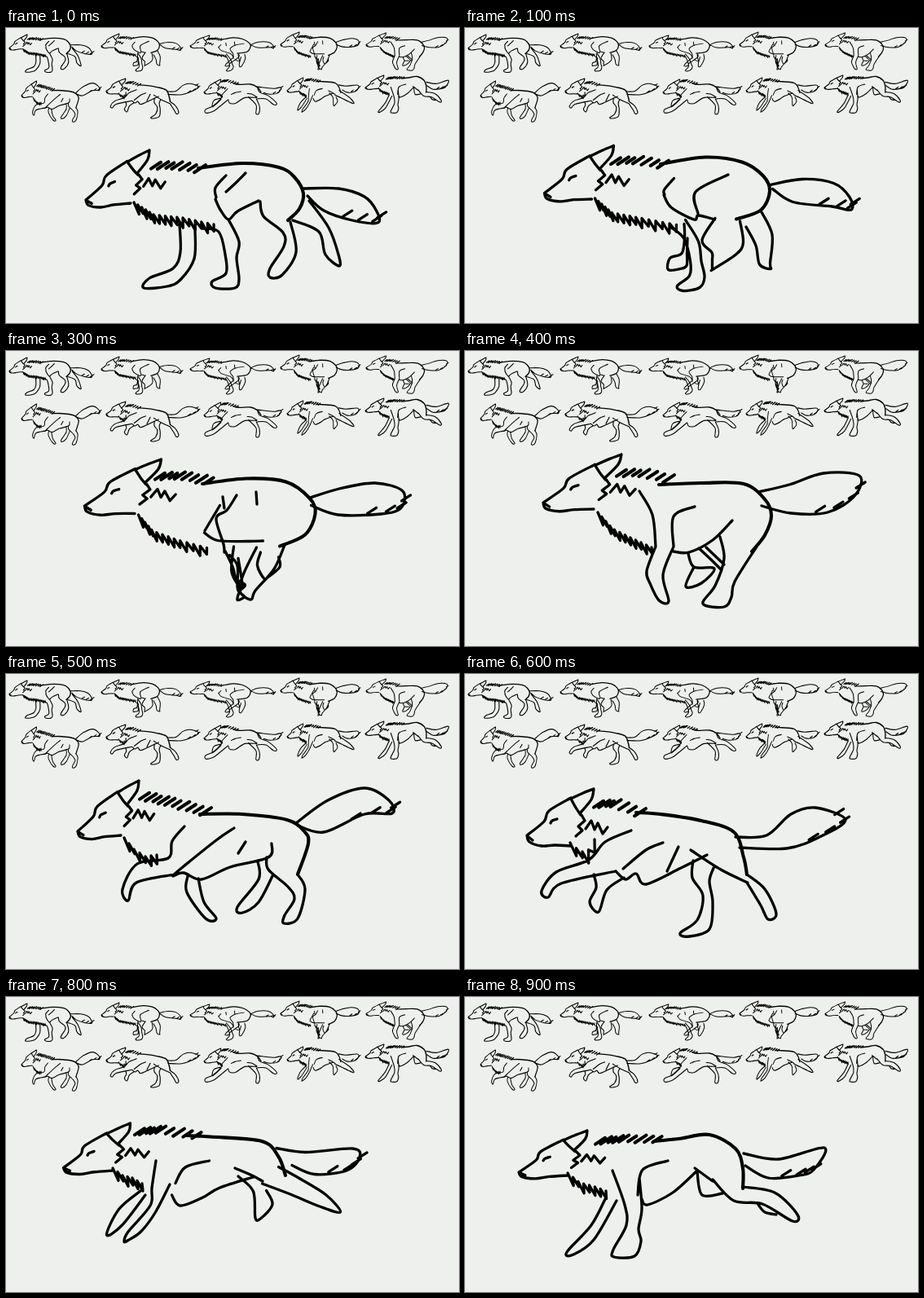
Recreate the animation shown at these times as an HTML page with a canvas. Size 556x362 px, loop 1000 ms.

```html
<!DOCTYPE html>
<html lang="en">
<head>
<meta charset="utf-8">
<title>Running wolf</title>
<style>
html, body { margin: 0; height: 100%; overflow: hidden; background: #eef0ed; }
canvas { display: block; }
</style>
</head>
<body>
<canvas id="stage" width="556" height="362"></canvas>
<script>
const ctx = stage.getContext("2d");

const parse = text => text.split("/").map(part => {
  const n = part.trim().split(/\s+/).map(Number);
  return n.flatMap((x, i) => i % 2 ? [] : [[x, n[i + 1]]]);
});
const pose = parts => Object.fromEntries(Object.entries(parts).map(([k, v]) => [k, parse(v)]));

// Halfway between two poses, part by part
function between(a, b) {
  const out = {};
  for (const key in a) out[key] = a[key].map((line, i) => {
    const other = b[key][i] || line;
    return line.map(([x, y], j) => {
      const [u, v] = other[Math.round(j * (other.length - 1) / (line.length - 1))];
      return [(x + u) / 2, (y + v) / 2];
    });
  });
  return out;
}

// head = nose, ear tip and end of the jaw
const contact = pose({
  head: "98 211 176 150 153 215",
  mane: "184 169 210 169 238 173",
  ruff: "158 218 182 233 218 237 256 245",
  back: "236 172 290 166 335 171 354 183 365 203 360 222 346 236",
  belly: "257 210 263 223 273 235 284 225 310 212",
  marks: "294 178 280 192 270 201/270 181 257 196 258 208",
  frontNear: "240 246 261 250 269 278 270 301 253 311 257 319 281 319 286 308 283 282 286 262 273 235",
  frontFar: "213 241 214 275 205 295 176 307 169 319 198 317 214 309 231 283 232 247",
  hindNear: "312 213 316 231 340 251 341 268 324 295 324 306 339 303 356 275 349 238",
  hindFar: "352 236 384 250 392 278 409 292 408 278 396 245 372 212",
  tail: "365 197 408 197 440 207 455 225 456 239 425 236 390 224 370 206"
});
const gather = pose({
  head: "97 194 189 139 158 205",
  mane: "186 158 215 156 248 162",
  ruff: "163 208 180 228 218 238 265 246",
  back: "244 162 300 151 345 158 378 180 383 198 366 225 320 233",
  belly: "231 200 244 218 289 235 303 258",
  marks: "352 182 312 190 286 210 300 234 302 254/243 188 232 201/266 179 268 193/307 173 308 188",
  frontNear: "264 242 276 266 284 294 281 307 268 322 278 326 295 318 302 303 297 290 287 262 268 236",
  frontFar: "325 240 327 258 330 274 314 269",
  hindNear: "302 254 266 290 266 300 283 296 285 286 327 252 326 236",
  hindFar: "338 252 330 284 331 302 341 299 358 262 355 238",
  tail: "384 188 420 174 465 174 489 190 492 207 476 202 415 203 385 189"
});
const landing = pose({
  head: "96 186 192 127 158 194",
  mane: "192 150 220 150 250 157",
  ruff: "164 202 182 222 206 234 230 245",
  back: "238 164 290 162 342 163 368 182 376 202 368 226 352 246",
  belly: "256 246 275 247 304 232 328 208",
  marks: "214 172 230 201 234 240/282 191 256 203 256 240",
  frontNear: "274 249 281 265 306 267 290 285 271 289 281 265",
  frontFar: "234 240 223 270 227 285 238 306 250 307 243 275 256 240",
  hindNear: "313 228 318 255 307 288 292 310 318 314 327 302 331 283 358 240",
  hindFar: "287 242 302 256 314 268/296 241 318 262",
  tail: "360 173 398 164 440 150 484 153 478 178 445 198 400 199 364 190"
});
const push = pose({
  head: "88 193 163 131 141 198",
  mane: "170 150 205 158 245 169",
  ruff: "146 205 158 219 172 228 186 226",
  back: "238 172 290 172 345 179 366 193 371 208 358 246",
  belly: "205 248 218 244 240 252 275 237 322 225 326 208",
  marks: "280 189 258 204 218 236 205 247/285 220 294 206",
  frontNear: "223 248 222 268 245 300 258 300 243 280 236 251",
  frontFar: "219 187 204 205 199 226 161 233 143 264 150 278 160 256 207 246",
  hindNear: "358 246 367 264 358 300 341 306 342 296 354 276 346 261 322 240 320 225",
  hindFar: "309 230 310 252 284 286 290 293 310 280 328 246",
  tail: "356 183 395 155 440 140 470 155 474 171 440 172 390 194 358 186"
});
const leap = pose({
  head: "76 198 158 141 131 211",
  mane: "164 160 185 159 215 170",
  ruff: "130 211 140 220 150 224 160 207",
  back: "210 170 240 172 290 180 330 194 342 225 346 246",
  belly: "185 242 197 252 210 245 222 258 265 238 297 222",
  marks: "243 207 222 216 194 239/262 212 248 242/277 216 314 240 347 256",
  frontNear: "204 192 172 206 152 228 112 243 94 266 102 274 118 257 185 242",
  frontFar: "158 246 161 262 153 280 164 292 174 265 195 250",
  hindNear: "280 229 279 250 292 272 285 302 264 318 275 322 300 313 304 280 300 254 306 236",
  hindFar: "346 246 368 264 382 294 372 301 363 284 346 256",
  tail: "332 200 370 198 400 172 430 164 467 179 435 200 395 214 337 213"
});
const stretch = pose({
  head: "75 204 155 146 135 207",
  mane: "162 154 185 152 232 165",
  ruff: "137 208 146 214 154 216 162 224",
  back: "212 163 240 169 296 168 328 182 345 203",
  belly: "190 238 195 252 212 256 228 252 270 228 325 228",
  marks: "250 201 222 206 204 214/280 210 300 212 326 226",
  frontNear: "187 189 162 214 156 232 118 266 82 282 84 297 119 290 150 268 188 238",
  frontFar: "157 230 122 241 114 268 127 262 156 236",
  hindNear: "328 184 340 205 378 219 419 253 405 260 368 234 325 234",
  hindFar: "285 225 322 262 321 299 335 300 338 268 323 234",
  tail: "322 179 350 182 410 187 440 182 426 207 385 213 358 206"
});
const reach = pose({
  head: "66 215 150 164 126 219",
  mane: "166 177 195 174 236 175",
  ruff: "127 220 142 232 158 236 174 242",
  back: "232 177 262 174 300 169 332 186 341 210 341 235",
  belly: "217 248 224 255 255 240 285 213",
  marks: "249 201 218 212 212 243/282 210 304 226",
  frontNear: "181 213 196 255 198 280 182 310 183 319 208 318 216 300 213 285 217 260 214 222",
  frontFar: "173 246 155 280 125 313 133 316 158 298 186 250",
  hindNear: "341 233 380 240 408 267 402 275 365 254 330 250 304 224",
  hindFar: "285 215 291 243 316 241/360 255 368 264 382 267",
  tail: "342 192 385 199 441 185 428 212 410 219 372 222 344 207"
});
const poses = [contact, between(contact, gather), gather, between(gather, landing), landing,
  push, leap, stretch, between(stretch, reach), reach];

// Head shape, fitted to the three head points of each pose
const face = parse("76 198 97 181 103 168 130 152/130 153 145 146 158 141/158 141 155 154 141 171/" +
  "130 153 136 164 142 173/76 198 79 206 94 211 110 210 131 211/105 183 107 180 113 178/78 200 83 204");
const cheek = parse("143 173 147 180 139 187 144 192 136 199/148 190 155 180 159 191 163 183 169 196 175 188");
const faceFit = leap.head[0];

// Left, top, width and height of each small drawing
const boxes = parse("4 8 104 46/117 7 100 46/226 9 105 44/337 5 98 46/442 6 101 46/" +
  "19 65 98 50/123 62 115 49/243 63 97 42/345 61 90 42/441 58 102 46");

function fit([n, e, j], [N, E, J]) {
  const ex = e[0] - n[0], ey = e[1] - n[1], jx = j[0] - n[0], jy = j[1] - n[1];
  const det = ex * jy - ey * jx;
  return ([x, y]) => {
    const dx = x - n[0], dy = y - n[1];
    const a = (dx * jy - dy * jx) / det, b = (ex * dy - ey * dx) / det;
    return [0, 1].map(k => N[k] + a * (E[k] - N[k]) + b * (J[k] - N[k]));
  };
}

function along(line, t) {
  const s = t * (line.length - 1), i = Math.min(Math.floor(s), line.length - 2), f = s - i;
  return [0, 1].map(k => line[i][k] + (line[i + 1][k] - line[i][k]) * f);
}

const span = line => Math.hypot(line.at(-1)[0] - line[0][0], line.at(-1)[1] - line[0][1]);

// Smooth curve through all points
function curve(path, p) {
  path.moveTo(...p[0]);
  for (let i = 0; i < p.length - 1; i++) {
    const a = p[i - 1] || p[i], b = p[i], c = p[i + 1], d = p[i + 2] || c;
    path.bezierCurveTo(b[0] + (c[0] - a[0]) / 6, b[1] + (c[1] - a[1]) / 6,
      c[0] - (d[0] - b[0]) / 6, c[1] - (d[1] - b[1]) / 6, ...c);
  }
}

function build(parts) {
  const thin = new Path2D(), bold = new Path2D(), all = [];
  const smooth = (line, path = thin) => { curve(path, line); all.push(...line); };
  const sharp = (line, path = thin) => {
    line.forEach((p, i) => i ? path.lineTo(...p) : path.moveTo(...p));
    all.push(...line);
  };
  const { head: [head], mane: [mane], ruff: [ruff], back, tail: [tail], ...rest } = parts;

  const place = fit(faceFit, head);
  face.forEach(line => smooth(line.map(place)));
  cheek.forEach(line => sharp(line.map(place)));
  back.forEach(line => smooth(line, bold));
  Object.values(rest).flat().forEach(line => smooth(line));
  smooth(tail);

  const tufts = Math.round(span(mane) / 9);
  for (let i = 0; i <= tufts; i++) {
    const [x, y] = along(mane, i / tufts), r = 6 + Math.sin(i * 2.3);
    sharp([[x - r, y + r * .6], [x + r, y - r * .7]], bold);
  }

  const teeth = Math.round(span(ruff) / 7) * 2, fringe = [];
  for (let i = 0; i <= teeth; i++) {
    const [x, y] = along(ruff, i / teeth);
    fringe.push(i % 2 ? [x + 3, y + 7 + 2 * Math.sin(i * 1.7)] : [x - 1, y - 4]);
  }
  sharp(fringe);

  for (let i = 0; i < 4; i++) {
    const [x, y] = along(tail, .52 + i * .08);
    sharp([[x, y - 1], [x + 11, y - 8]]);
  }

  const xs = all.map(p => p[0]), ys = all.map(p => p[1]);
  const x = Math.min(...xs), y = Math.min(...ys);
  return { thin, bold, x, y, w: Math.max(...xs) - x, h: Math.max(...ys) - y };
}

function ink(wolf, weight) {
  ctx.lineWidth = 3.3 * weight;
  ctx.stroke(wolf.thin);
  ctx.lineWidth = 4.1 * weight;
  ctx.stroke(wolf.bold);
}

const wolves = poses.map(build);
ctx.lineCap = ctx.lineJoin = "round";

function draw() {
  ctx.fillStyle = "#eef0ed";
  ctx.fillRect(0, 0, 556, 362);
  wolves.forEach((wolf, i) => {
    const [[x, y], [w, h]] = boxes[i];
    ctx.save();
    ctx.translate(x, y);
    ctx.scale(w / wolf.w, h / wolf.h);
    ctx.translate(-wolf.x, -wolf.y);
    ink(wolf, 1.2);
    ctx.restore();
  });
  ink(wolves[Math.floor(performance.now() / 100) % wolves.length], 1);
  requestAnimationFrame(draw);
}
draw();
</script>
</body>
</html>
```
